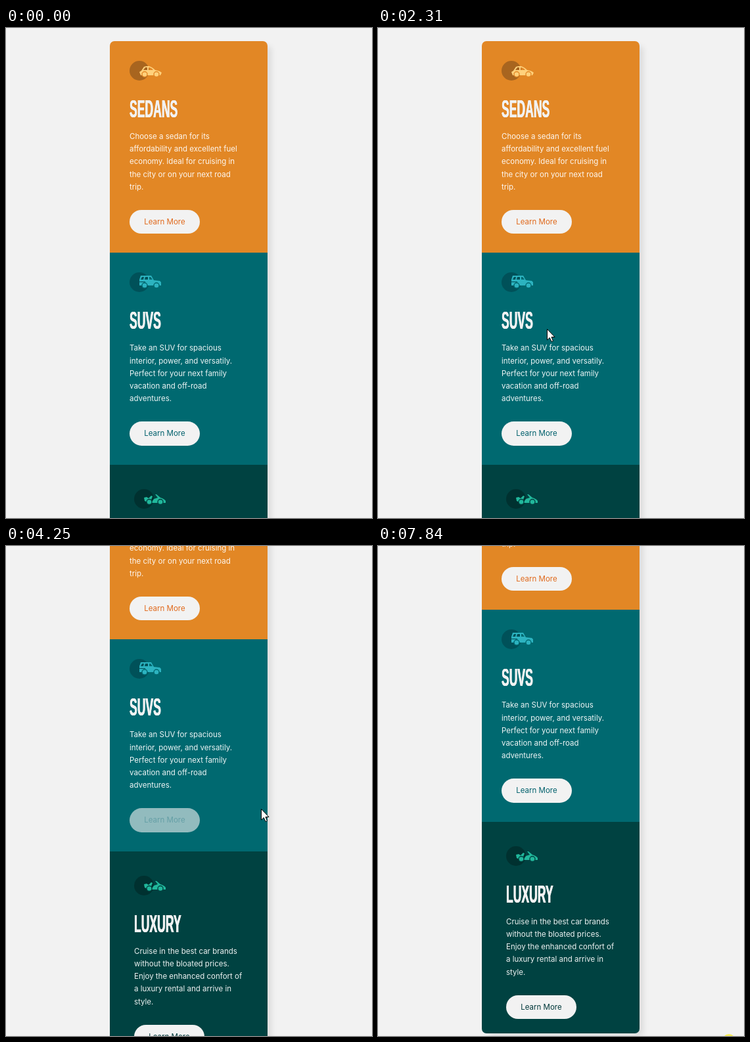
Write an HTML page that moves like this. It is 557x746 px and loops after 7900 ms.

```html
<!DOCTYPE html>
<html lang="en">
<head>
<meta charset="utf-8">
<title>Car cards</title>
<style>
html, body { margin: 0; width: 100%; height: 100%; overflow: hidden; background: #f2f2f2; }
body { position: relative; font: 11.5px/19.2px Inter, sans-serif; }
#card { position: absolute; left: 158px; top: 20px; width: 240px; height: 967px; border-radius: 7px;
  box-shadow: 8px 6px 10px -2px rgba(0, 0, 0, .09); }
section { position: absolute; left: 0; width: 240px; height: 322.4px; background: var(--bg); }
section:first-child { border-radius: 7px 7px 0 0; }
section:last-child { border-radius: 0 0 7px 7px; }
section > * { position: absolute; left: var(--pad); margin: 0; white-space: nowrap; }
section > svg { top: var(--pad); width: 50px; height: 30px; overflow: visible; }
h2 { top: calc(var(--pad) + 55px); font: bold 37px/37px "Liberation Sans", Arial, sans-serif; color: #f2f2f2;
  text-shadow: .7px 0, -.7px 0; transform: scaleX(.475); transform-origin: 0 0; }
p { top: calc(var(--pad) + 106px); color: rgba(255, 255, 255, .93); }
.btn { top: calc(var(--pad) + 227px); width: 107px; height: 36.4px; line-height: 36.4px; border: 0 solid #fff;
  border-radius: 21px; text-align: center; }
#cursor { position: absolute; left: 0; top: 0; width: 1px; height: 1px; overflow: visible; }
#glow { position: absolute; left: 524px; top: 743px; width: 20px; height: 20px; border-radius: 50%; background: #f8ee5a; }
</style>
</head>
<body>
<div id="card"></div>
<div id="glow"></div>
<svg id="cursor"><path stroke-linejoin="round"/></svg>
<script>
const LOOP = 7900, SECTION = 322.4;
const cars = [
  { name: 'SEDANS', pad: 30, bg: '#e28725', dark: '#a8651f', car: '#ffd17c', ink: '#e0691c',
    on: 850, off: 1850, border: 1,
    text: ['Choose a sedan for its', 'affordability and excellent fuel', 'economy. Ideal for cruising in', 'the city or on your next road', 'trip.'],
    body: 'M15 17L18 15L22 9Q25 8 29 8Q34 9 39 14Q46 15 49 18L47 22H17ZM21 14H27V10H24ZM29 10V14H36Q33 10 29 10Z',
    wheels: [23, 41], axle: 20.5 },
  { name: 'SUVS', pad: 30, bg: '#006970', dark: '#005159', car: '#2cb3c0', ink: '#00606c',
    on: 3080, off: 4140, border: 2,
    text: ['Take an SUV for spacious', 'interior, power, and versatily.', 'Perfect for your next family', 'vacation and off-road', 'adventures.'],
    body: 'M17 5H33L37 12L46 13L48 15V20H15V11ZM19 7L17 11H21L22 7ZM24 7L23 11H28V7ZM30 7V11H35L32 7ZM15 14V15H24V14Z',
    wheels: [23, 41], axle: 20 },
  { name: 'LUXURY', pad: 37, bg: '#004241', dark: '#003130', car: '#21b89c', ink: '#00383a',
    on: 5200, off: 6720, border: 2,
    text: ['Cruise in the best car brands', 'without the bloated prices.', 'Enjoy the enhanced confort of', 'a luxury rental and arrive in', 'style.'],
    body: 'M15 13L19 12L22 14L26 10L28 11L26 16L20 20L16 18ZM26 21L30 15L36 13L32 8L34 8L40 13Q46 15 48 18V21Z',
    wheels: [23, 40], axle: 19.5 },
];
const shapes = {
  arrow: 'M.5 .5V17L4.300 13.500L7 19.500L9.500 18.500L7 12.500H12Z',
  hand: 'M-2 2Q-.5 -1 1.500 2V9Q3.500 7.500 5 9.500Q7 8.500 8 10.500Q10.500 9.500 11 12.500V17Q10.500 19 9 23.500H1Q0 20 -5 15Q-6.500 11.500 -3.500 12L-2 14Z',
  beam: 'M-3 -7H-1L0 -6L1 -7H3M0 -6V7M-3 8H-1L0 7L1 8H3',
};
// Pointer stops: time, x, y
const path = [
  [70, 528, 738], [850, 253, 290], [1780, 253, 290], [2400, 257, 468], [2840, 257, 468],
  [3180, 262, 418], [3980, 262, 418], [4250, 388, 400], [4720, 380, 440],
  [5040, 282, 612], [5320, 273, 705], [6650, 273, 705], [7170, 530, 748],
];

const $ = id => document.getElementById(id);
const ramp = (t, a, b) => Math.min(1, Math.max(0, (t - a) / (b - a)));
const smooth = x => x * x * (3 - 2 * x);
const easeOut = x => 1 - (1 - x) ** 2;

$('card').innerHTML = cars.map((c, i) => `
  <section style="--bg:${c.bg};--pad:${c.pad}px;top:${i * SECTION}px">
    <svg><circle cx="15" cy="15" r="15" fill="${c.dark}"/>
      <path d="${c.body}" fill="${c.car}" fill-rule="evenodd"/>
      ${c.wheels.map(x => `<circle cx="${x}" cy="${c.axle}" r="4" fill="${c.car}" stroke="${c.bg}" stroke-width="1.400"/>`).join('')}
    </svg>
    <h2>${c.name}</h2>
    <p>${c.text.join('<br>')}</p>
    <div class="btn">Learn More</div>
  </section>`).join('');
const buttons = document.querySelectorAll('.btn');
const pointer = $('cursor').firstChild;

function pointerAt(t) {
  const i = path.findIndex(s => s[0] > t);
  if (i < 1) return null;
  const [a, x, y] = path[i - 1], [b, x2, y2] = path[i];
  const k = smooth(ramp(t, a, b));
  return [x + (x2 - x) * k, y + (y2 - y) * k];
}

function paintButton(c, el, t) {
  const hovered = t >= c.on && t < c.off;
  const enter = ramp(t, c.on, c.on + 300), leave = ramp(t, c.off, c.off + 300);
  const k = easeOut(enter) - easeOut(leave);
  const width = hovered ? Math.min(c.border, Math.floor(2 * enter)) : 0;
  el.style.background = `rgba(242,242,242,${1 - k})`;
  el.style.color = `color-mix(in srgb, #fff ${k * 100}%, ${c.ink})`;
  el.style.borderWidth = width + 'px';
}

function draw(now) {
  const t = now % LOOP;
  const scroll = Math.round(200 * smooth(ramp(t, 2460, 2920)) + 45 * smooth(ramp(t, 4400, 4720)));
  $('card').style.top = 20 - scroll + 'px';
  cars.forEach((c, i) => paintButton(c, buttons[i], t));

  const pos = pointerAt(t);
  $('cursor').style.display = pos ? '' : 'none';
  if (pos) {
    const [x, y] = pos.map(Math.round);
    const overText = cars.some((c, i) => {
      const dy = y + scroll - 20 - i * SECTION - c.pad - 106;
      return dy > 0 && dy < 96 && x > 158 + c.pad && x < 398 - c.pad;
    });
    const kind = cars.some(c => t >= c.on && t < c.off) ? 'hand' : overText ? 'beam' : 'arrow';
    pointer.setAttribute('d', shapes[kind]);
    pointer.setAttribute('fill', kind === 'beam' ? 'none' : '#fff');
    pointer.setAttribute('stroke', kind === 'beam' ? '#d5dddd' : '#000');
    $('cursor').style.transform = `translate(${x}px,${y}px)`;
  }
  $('glow').style.display = t >= 7840 ? '' : 'none';
}

const start = performance.now();
function tick() {
  draw(performance.now() - start);
  requestAnimationFrame(tick);
}
tick();
</script>
</body>
</html>
```
